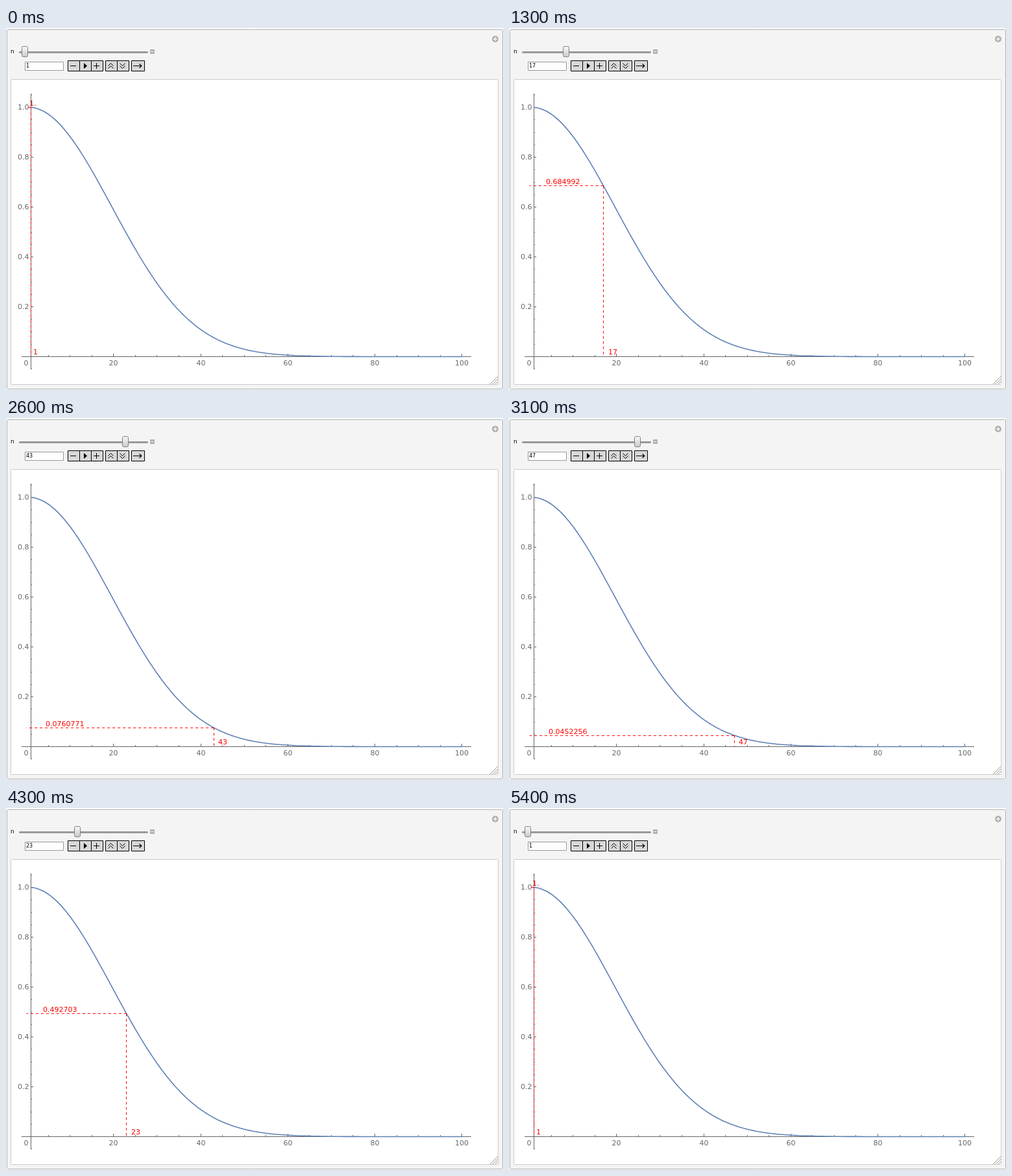
Write an HTML page with a canvas that moves like this. It is 766x559 px and loops after 6 s.

```html
<!DOCTYPE html>
<html lang="en">
<head>
<meta charset="utf-8">
<title>Birthday curve</title>
<style>
  html, body { margin: 0; width: 100%; height: 100%; overflow: hidden; background: #fff; }
  canvas { display: block; }
</style>
</head>
<body>
<canvas id="stage" width="766" height="559"></canvas>
<script>
const ctx = document.getElementById('stage').getContext('2d');
const LOOP = 6000, STEP = 100, HOLD = 600, LAST = 49;
const FONT = '"DejaVu Sans", sans-serif';
const AXIS = '#666', RED = '#f00';

// Probability that n people all have different birthdays.
const chance = [1];
for (let n = 1; n <= 100; n++) chance[n] = chance[n - 1] * (366 - n) / 365;

const plotX = n => 31.5 + 6.713 * n;
const plotY = p => 507.5 - 385 * p;
const crisp = v => Math.floor(v) + 0.5;

function stroke(points, color, width = 1, dash = []) {
  ctx.beginPath();
  points.forEach(([x, y]) => ctx.lineTo(x, y));
  ctx.strokeStyle = color;
  ctx.lineWidth = width;
  ctx.setLineDash(dash);
  ctx.stroke();
  ctx.setLineDash([]);
}

function box(x, y, w, h, fill, border, radius = 0) {
  ctx.beginPath();
  ctx.roundRect(x, y, w, h, radius);
  ctx.fillStyle = fill;
  ctx.fill();
  if (!border) return;
  ctx.strokeStyle = border;
  ctx.lineWidth = 1;
  ctx.stroke();
}

function text(str, x, y, color, size = 11, align = 'left') {
  ctx.font = `${size}px ${FONT}`;
  ctx.textAlign = align;
  ctx.fillStyle = color;
  ctx.fillText(str, x, y);
}

function drawPanel() {
  ctx.fillStyle = '#fff';
  ctx.fillRect(0, 0, 766, 559);
  box(1.5, 2.5, 764, 555, '#f4f4f4', '#b0b0b0', 1);
  box(7.5, 79.5, 751, 471, '#fff', '#ccc', 1);
  for (const d of [4, 8, 12]) stroke([[758 - d, 550], [758, 550 - d]], '#999');

  ctx.beginPath();
  ctx.arc(754, 17, 5, 0, 2 * Math.PI);
  ctx.fillStyle = '#b0b0b0';
  ctx.fill();
  stroke([[751, 17], [757, 17]], '#fff', 1.3);
  stroke([[754, 14], [754, 20]], '#fff', 1.3);
}

function chevrons(x, dir) {
  for (const y of [56.5, 60.5]) {
    stroke([[x - 4, y + 2 * dir], [x, y - 2 * dir], [x + 4, y + 2 * dir]], '#000');
  }
}

function drawButtons() {
  const cells = [[95, 18], [113, 18], [131, 18], [153, 18], [171, 18], [193, 20]];
  for (const [x, w] of cells) box(x + 0.5, 50.5, w, 16, '#d8d8d8', '#000');
  stroke([[99, 58.5], [108, 58.5]], '#000');
  ctx.beginPath();
  ctx.moveTo(120, 54);
  ctx.lineTo(125, 58.5);
  ctx.lineTo(120, 63);
  ctx.fillStyle = '#000';
  ctx.fill();
  stroke([[135, 58.5], [144, 58.5]], '#000');
  stroke([[139.5, 54], [139.5, 63]], '#000');
  chevrons(161.5, 1);
  chevrons(179.5, -1);
  stroke([[196, 58.5], [209, 58.5]], '#000');
  stroke([[205.5, 55.5], [208.8, 58.5], [205.5, 61.5]], '#000', 1.2);
}

function drawControls(n) {
  text('n', 7, 39, '#000', 9);
  box(20, 36, 199, 3, '#999', null, 1.5);
  box(222, 33, 7, 7, '#b0b0b0', null, 1);
  stroke([[223.5, 36.5], [227.5, 36.5]], '#fff');

  const x = Math.round(29 + 3.683 * (n - 1)) - 4.5;
  const shade = ctx.createLinearGradient(0, 28, 0, 45);
  shade.addColorStop(0, '#fafafa');
  shade.addColorStop(1, '#c8c8c8');
  box(x, 28.5, 9, 16, shade, '#808080', 2);

  box(29.5, 52.5, 59, 13, '#fff', '#999');
  text(n, 31, 61, '#000', 8);
  drawButtons();
}

function drawAxes() {
  stroke([[24, 507.5], [717, 507.5]], AXIS);
  stroke([[38.5, 101], [38.5, 527]], AXIS);
  for (let n = 5; n <= 100; n += 5) {
    const x = crisp(plotX(n)), major = n % 20 === 0;
    stroke([[x, 507], [x, major ? 503 : 505]], AXIS);
    if (major) text(n, x, 521, AXIS, 11, 'center');
  }
  text('0', 31, 521, AXIS, 11, 'center');
  for (let i = -1; i <= 21; i++) {
    const y = crisp(plotY(i / 20)), major = i > 0 && i % 4 === 0;
    stroke([[39, y], [major ? 42 : 40, y]], AXIS);
    if (major) text((i / 20).toFixed(1), 35.5, y + 3.5, AXIS, 11, 'right');
  }
}

function drawCurve() {
  const points = chance.map((p, n) => [plotX(n), plotY(p)]).slice(1);
  ctx.lineJoin = 'round';
  stroke(points, '#5e81b5', 1.6);
}

// Labels sit half their own width to the right of the anchor.
function redLabel(str, x, y) {
  ctx.font = `11px ${FONT}`;
  text(str, Math.round(x + ctx.measureText(str).width / 2), y, RED);
}

function drawReading(n) {
  const p = chance[n], px = plotX(n), py = plotY(p);
  const x = crisp(px), y = crisp(py);
  stroke([[x, py], [x, 507.5]], RED, 1, [4, 4]);
  stroke([[px, y], [plotX(0), y]], RED, 1, [4, 4]);
  redLabel(n === 1 ? '1.' : String(Number(p.toPrecision(6))), 31, y - 3);
  redLabel(String(n), px, 504);
}

function countAt(ms) {
  const k = Math.floor((ms - HOLD) / STEP) + 1;
  return 1 + 2 * Math.max(0, Math.min(k, LAST - k));
}

function draw(n) {
  drawPanel();
  drawControls(n);
  drawAxes();
  drawCurve();
  drawReading(n);
}

const start = performance.now();
function tick() {
  draw(countAt((performance.now() - start) % LOOP));
  requestAnimationFrame(tick);
}
tick();
</script>
</body>
</html>
```
